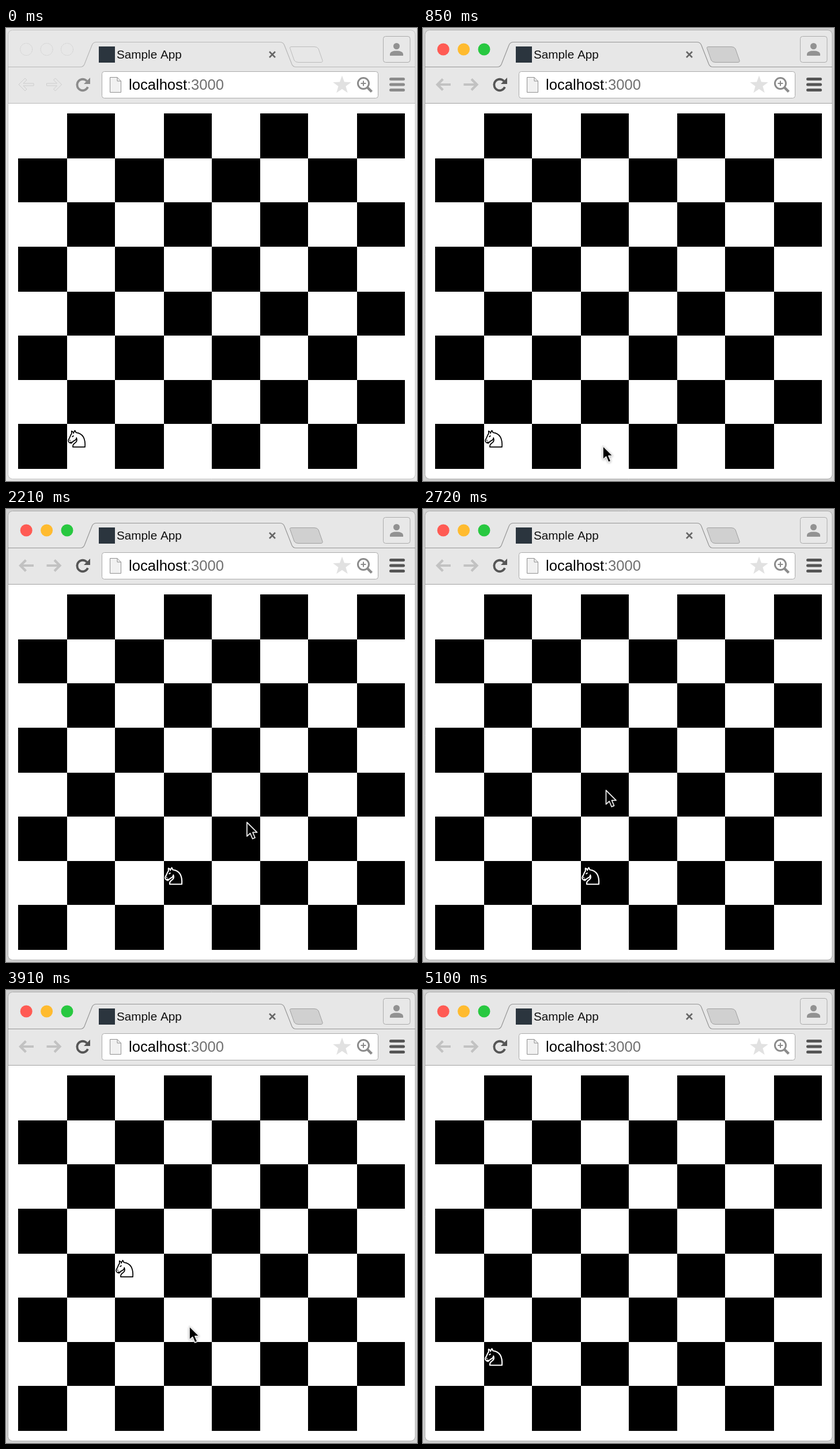
An HTML page with a canvas that plays this animation: 713x785 px, repeating every 5.44 s.

```html
<!DOCTYPE html>
<html lang="en">
<head>
<meta charset="utf-8">
<title>Knight moves</title>
<style>
html, body { margin: 0; width: 100%; height: 100%; overflow: hidden; }
canvas { display: block; }
</style>
</head>
<body>
<canvas id="stage" width="713" height="785"></canvas>
<script>
const ctx = document.getElementById('stage').getContext('2d');
const STEP = 170, STEPS = 32;
const COLS = [21, 106, 189, 274, 357, 441, 524, 609, 692];
const ROWS = [148, 226, 302, 379, 457, 533, 610, 686, 764];

// Pointer stops: [step, x, y]
const POINTER = [
  [1, 303, 719], [3, 303, 719], [5, 311, 723], [7, 314, 694], [9, 315, 650],
  [10, 317, 646], [11, 332, 632], [13, 417, 542], [14, 434, 508],
  [15, 395, 488], [17, 238, 485], [18, 230, 487], [20, 303, 491],
  [22, 342, 548], [24, 292, 615], [25, 247, 647], [27, 145, 658],
  [28, 134, 668], [29, 150, 728]
];

// Knight squares: [first step, column, row]
const KNIGHT = [[0, 1, 7], [11, 3, 6], [18, 2, 4], [28, 1, 6]];

const ARROW = new Path2D('M1 1V25L6.7 20L10.7 29.5L15 27.6L11 18.4H18.5Z');
const HORSE = new Path2D(
  'M9 29.5H30C31 16 27.5 6 14.5 4.5L12.5 .8L10.5 4.2L6.8 1.8V6.5' +
  'C4.5 9 4.5 12 1.8 16C.6 18 1 21 3.6 22.2L5.8 20.8L5.5 23' +
  'C8 22 8.4 19.6 11 18.7C13.2 18 15 16.5 15.3 13.5' +
  'C17 18 15.5 20.5 12.5 22.5C10 24 8.7 26 9 29.5Z' +
  'M7.5 11.8L10.5 9.8M3.5 18.4L4.4 17.3M10.5 4.2L9.8 6.2');
const TAB = new Path2D(
  'M3 67.5H129Q134 67.5 136 63L149 30Q151 24.5 157 24.5H475' +
  'Q481 24.5 483 30L496 63Q498 67.5 503 67.5H710');
const NEW_TAB = new Path2D(
  'M496 32.5H535Q540 32.5 542 36L549 56Q550 59.5 546 59.5' +
  'H507Q502 59.5 500 56L493 36Q491 32.5 496 32.5Z');
const BACK = new Path2D('M22 98L33 87L36 90L30 96H48V100H30L36 106L33 109Z');

function fill(path, color) { ctx.fillStyle = color; ctx.fill(path); }

function stroke(path, color, width = 1) {
  ctx.strokeStyle = color;
  ctx.lineWidth = width;
  ctx.stroke(path);
}

function line(d, color, width) { stroke(new Path2D(d), color, width); }

function circle(x, y, r) {
  const path = new Path2D();
  path.arc(x, y, r, 0, 7);
  return path;
}

function box(x, y, w, h, r) {
  const path = new Path2D();
  path.roundRect(x, y, w, h, r);
  return path;
}

function text(str, x, y, size, color) {
  ctx.font = `${size}px "Liberation Sans", Arial, sans-serif`;
  ctx.fillStyle = color;
  ctx.fillText(str, x, y);
}

function drawWindow(active) {
  ctx.fillStyle = active ? '#d0d0d0' : '#e4e4e4';
  ctx.fillRect(0, 0, 713, 785);
  const frame = box(3.5, 3.5, 706.5, 778, 8);
  fill(frame, '#fff');
  ctx.save();
  ctx.clip(frame);
  ctx.fillStyle = '#e7e7e7';
  ctx.fillRect(3, 3, 708, 127);
  ctx.restore();
  stroke(frame, active ? '#a8a8a8' : '#c0c0c0');
  line('M4 130.5H710', active ? '#a2a2a2' : '#bababa');
}

function drawTabs(active) {
  const edge = active ? '#969696' : '#b8b8b8';
  ['#ff5b54', '#ffbb2f', '#28c840'].forEach((color, i) => {
    const light = circle(35.2 + 35.4 * i, 37, 10.5);
    if (active) return fill(light, color);
    ctx.setLineDash([2, 1]);
    stroke(light, '#cfcfcf');
    ctx.setLineDash([]);
  });
  stroke(TAB, edge, 1.2);
  fill(NEW_TAB, active ? '#d0d0d0' : '#e7e7e7');
  stroke(NEW_TAB, active ? '#a0a0a0' : '#bcbcbc');
  ctx.fillStyle = '#2b353e';
  ctx.fillRect(161, 32, 28, 28);
  text('Sample App', 192, 53, 20.7, '#111');
  line('M457 41L467 51M467 41L457 51', '#666', 2.6);

  const profile = box(654.5, 14.5, 46.5, 45, 4);
  fill(profile, '#e8e8e8');
  stroke(profile, '#ababab');
  fill(circle(677.5, 31.5, 5.5), '#929292');
  fill(new Path2D('M666 48V45Q667 39.5 677.5 39.5Q688 39.5 689 45V48Z'), '#929292');
}

function drawToolbar(active) {
  const dark = active ? '#555' : '#8b8b8b';
  for (const flip of [false, true]) {
    ctx.save();
    if (flip) {
      ctx.translate(118.5, 0);
      ctx.scale(-1, 1);
    }
    if (active) fill(BACK, '#c2c2c2');
    else stroke(BACK, '#cdcdcd');
    ctx.restore();
  }

  const reload = new Path2D();
  reload.arc(133, 98.5, 9.7, 0.4, 5.55);
  stroke(reload, dark, 3.8);
  fill(new Path2D('M146 86V97H135Z'), dark);

  const address = box(166.5, 75.5, 479, 46, 4);
  fill(address, '#fff');
  stroke(address, '#aaa');

  const page = new Path2D('M180.5 85.5H193L199.5 92V111.5H180.5Z');
  fill(page, '#f1f1f1');
  stroke(page, '#8f8f8f');
  line('M193 85.5V92H199.5', '#8f8f8f');
  text('localhost', 213, 107, 25.6, '#000');
  text(':3000', 314, 107, 25.6, '#707070');

  const star = new Path2D();
  for (let i = 0; i < 10; i++) {
    const r = i % 2 ? 6.8 : 16.5, a = i * Math.PI / 5;
    star.lineTo(583 + r * Math.sin(a), 99 - r * Math.cos(a));
  }
  star.closePath();
  fill(star, '#e1e1e1');

  stroke(circle(620, 96, 9.5), '#8b8b8b', 3);
  line('M627 103L634.5 110.5', '#8b8b8b', 4.5);
  line('M615.5 96H624.5M620 91.5V100.5', '#8b8b8b', 2);

  for (const y of [86, 95.5, 105]) fill(box(665, y, 27, 5, 2.5), dark);
}

function drawBoard() {
  ctx.fillStyle = '#000';
  for (let row = 0; row < 8; row++) {
    for (let col = 1 - row % 2; col < 8; col += 2) {
      ctx.fillRect(COLS[col], ROWS[row],
        COLS[col + 1] - COLS[col], ROWS[row + 1] - ROWS[row]);
    }
  }
}

function drawKnight(step) {
  const [, col, row] = KNIGHT.findLast(k => k[0] <= step);
  const onBlack = (col + row) % 2;
  ctx.save();
  ctx.translate(COLS[col] + 1, ROWS[row] + 10.7);
  ctx.lineJoin = 'round';
  stroke(HORSE, onBlack ? '#fff' : '#000', onBlack ? 2.1 : 1.7);
  ctx.restore();
}

function pointerAt(step) {
  const next = POINTER.findIndex(p => p[0] >= step);
  if (step < 1 || next < 0) return null;
  const b = POINTER[next], a = POINTER[next - 1] || b;
  const k = a === b ? 0 : (step - a[0]) / (b[0] - a[0]);
  return [a[1] + (b[1] - a[1]) * k, a[2] + (b[2] - a[2]) * k];
}

function drawPointer(step) {
  const at = pointerAt(step);
  if (!at) return;
  ctx.save();
  ctx.translate(...at);
  ctx.shadowColor = 'rgba(0,0,0,.45)';
  ctx.shadowBlur = 4;
  ctx.shadowOffsetY = 1;
  fill(ARROW, '#fff');
  ctx.shadowColor = 'transparent';
  fill(ARROW, '#000');
  ctx.lineJoin = 'round';
  stroke(ARROW, '#e8e8e8', 1.8);
  ctx.restore();
}

function draw(now) {
  const step = Math.floor(now / STEP) % STEPS;
  const active = step >= 2;
  drawWindow(active);
  drawTabs(active);
  drawToolbar(active);
  drawBoard();
  drawKnight(step);
  drawPointer(step);
}

const start = performance.now();
function tick() {
  draw(performance.now() - start);
  requestAnimationFrame(tick);
}
tick();
</script>
</body>
</html>
```
